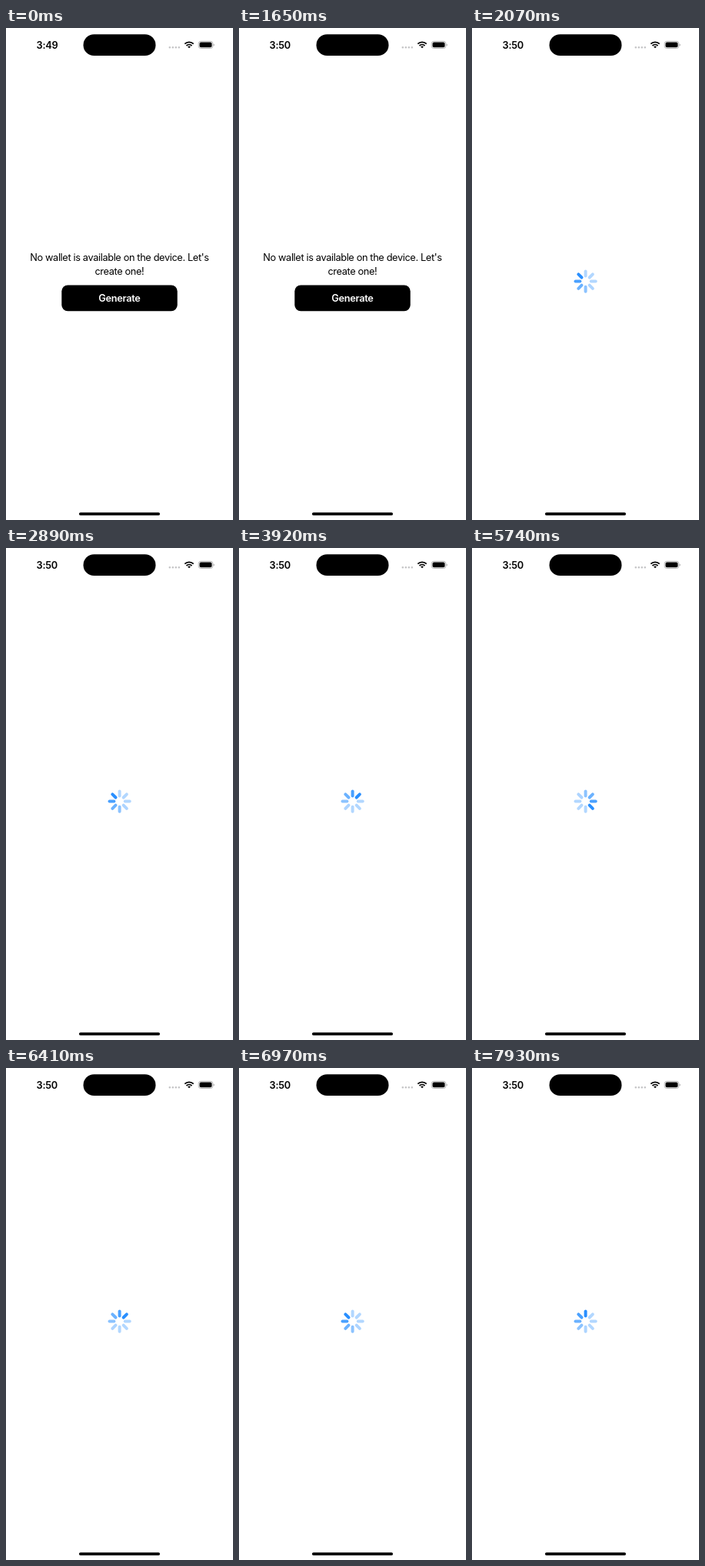
An HTML page for the animation above (9890 ms loop, 295 by 640 pixels).

```html
<!DOCTYPE html>
<html lang="en">
<meta charset="utf-8">
<title>Wallet setup</title>
<style>
  html, body { margin: 0; width: 100%; height: 100%; overflow: hidden; background: #fff; }
  svg { display: block; width: 295px; height: 640px; }
  text { font: 12.76px Inter, "Liberation Sans", sans-serif; letter-spacing: -.36px; }
  .bold { font-weight: 600; letter-spacing: -.28px; }
  .center { text-anchor: middle; }
  #spinner { stroke: #007aff; stroke-width: 4; stroke-linecap: round; }
</style>
<svg viewBox="0 0 295 640">
  <text id="clock" class="bold" x="39.6" y="26.6"></text>
  <rect x="100.5" y="8.3" width="94" height="27.8" rx="13.9"/>
  <path d="M212.8 25.2h13" stroke="#c4c4c6" stroke-width="2.6" stroke-linecap="round" stroke-dasharray="0 4"/>
  <path d="M232.3 20.7a8.1 8.1 0 0 1 11.4 0M234.5 23a5 5 0 0 1 7 0" fill="none" stroke="#000" stroke-width="1.8"/>
  <path d="M236.2 24.4a2.6 2.6 0 0 1 3.6 0L238 26.3z"/>
  <rect x="250.2" y="17.3" width="18.6" height="9.2" rx="3" fill="none" stroke="#a6a6a6" stroke-width=".8"/>
  <rect x="251.5" y="18.6" width="16" height="6.6" rx="1.8"/>
  <path d="M269.6 20.4q1.2 .4 1.2 1.5t-1.2 1.5z" fill="#a6a6a6"/>

  <g id="intro">
    <text class="center" x="147.4" y="303.2">No wallet is available on the device. Let's</text>
    <text class="center" x="147.4" y="321.2">create one!</text>
    <rect x="72.3" y="334.5" width="150.4" height="33.8" rx="8"/>
    <text class="bold center" x="147.4" y="356" fill="#fff">Generate</text>
  </g>
  <g id="spinner" transform="translate(147.6 329.6)"></g>
  <rect x="94.9" y="630.2" width="105.2" height="3.8" rx="1.9"/>
</svg>
<script>
  const LOOP = 9890, CLOCK_TICK = 1650, LOADING = 1960, FREEZE = 7930;
  const SPOKES = 8, STEP = 102, PHASE = 2164;

  const byId = id => document.getElementById(id);
  const clock = byId("clock"), intro = byId("intro"), spinner = byId("spinner");

  const spokes = Array.from({ length: SPOKES }, (_, i) => {
    const line = document.createElementNS("http://www.w3.org/2000/svg", "line");
    line.setAttribute("y1", -7.2);
    line.setAttribute("y2", -13.1);
    line.setAttribute("transform", `rotate(${i * 360 / SPOKES})`);
    return spinner.appendChild(line);
  });

  function draw(t) {
    const loading = t >= LOADING;
    clock.textContent = t < CLOCK_TICK ? "3:49" : "3:50";
    intro.style.display = loading ? "none" : "";
    spinner.style.display = loading ? "" : "none";

    // The brightest spoke moves clockwise, with a short fading trail behind it
    const head = Math.floor((Math.min(t, FREEZE) - PHASE) / STEP);
    spokes.forEach((spoke, i) => {
      const age = (head - i + 4 * SPOKES) % SPOKES;
      spoke.style.strokeOpacity = Math.max(.3, .84 - .13 * age);
    });
  }

  const start = performance.now();
  function tick() {
    draw((performance.now() - start) % LOOP);
    requestAnimationFrame(tick);
  }
  tick();
</script>
</html>
```
